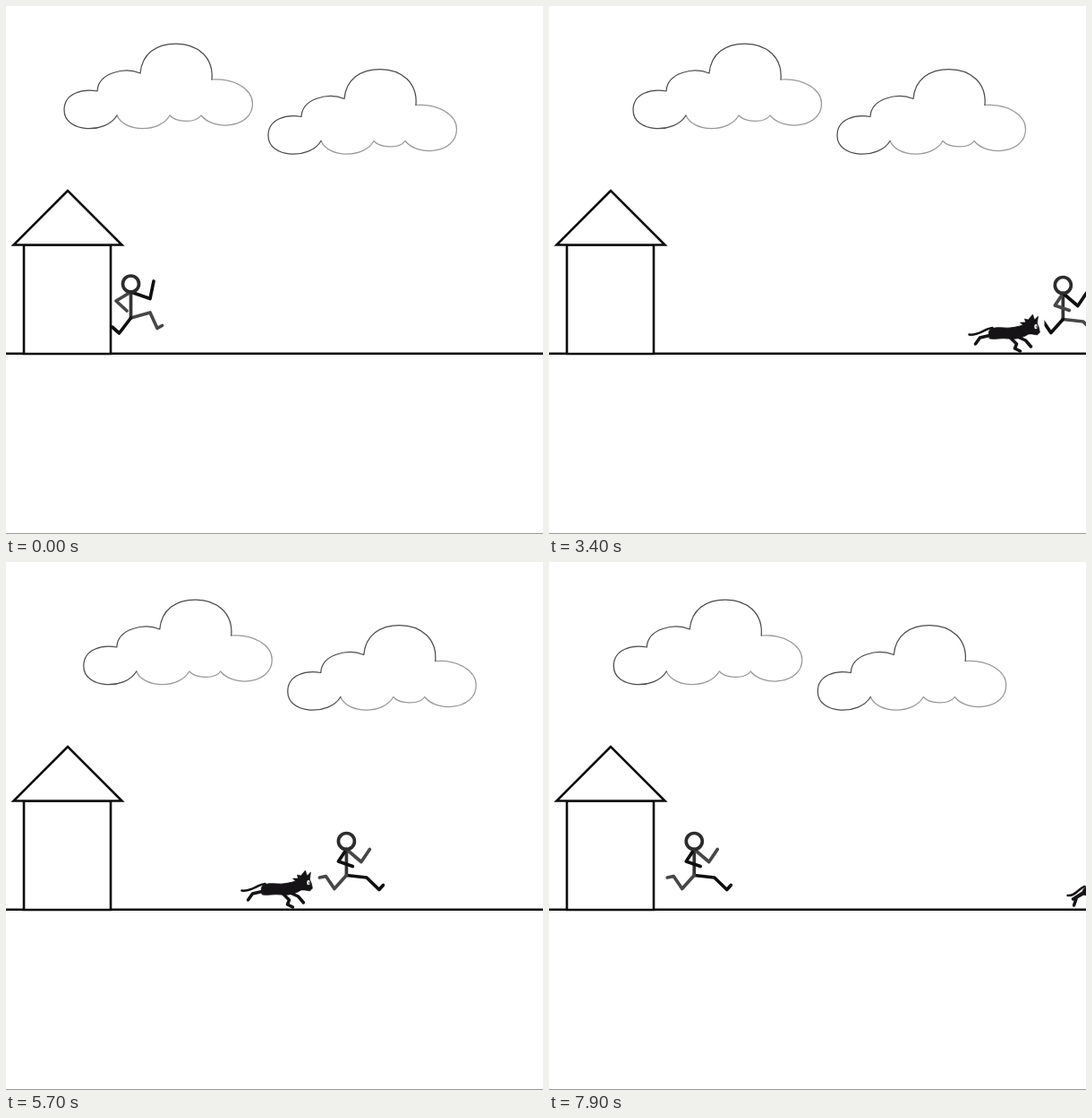
Write an HTML page that moves like this. It is 600 by 589 pixels and loops after 8000 ms.

```html
<!DOCTYPE html>
<html lang="en">
<head>
<meta charset="utf-8">
<title>Cat chase</title>
<style>
  html, body { margin: 0; width: 100%; height: 100%; overflow: hidden; background: #fff; }
  svg { display: block; width: 600px; height: 589px; }
  path, circle, line { fill: none; stroke-linecap: round; stroke-linejoin: round; }
  .house { stroke: #0c0c0c; stroke-width: 2.6; stroke-linejoin: miter; fill: #fff; }
  .man { stroke-width: 3.7; }
  .cat path { stroke: #151315; }
</style>
</head>
<body>
<svg viewBox="0 0 600 589">
  <defs>
    <g id="cloud" stroke-width="1.25">
      <path stroke="#999" d="M230,82 C255,80 275.500,93 275.500,109 C275.500,136 232,140 218,122 C212,131 190,130 183,122 C172,142 132,141 124,122"/>
      <path stroke="#4c4c4c" d="M124,122 C112,143 65,142 65,116 C65,97 86,92 102,95 C103,74 133,68 150,75 C152,53 168,42 190,42 C215,42 232,58 230,82"/>
    </g>
  </defs>
  <g id="clouds">
    <use href="#cloud"/>
    <use href="#cloud" x="228" y="28.500"/>
  </g>
  <g id="man" class="man"></g>
  <g id="cat" class="cat"></g>
  <line x1="0" y1="387.700" x2="600" y2="387.700" stroke="#0c0c0c" stroke-width="2.6"/>
  <path class="house" d="M20,266.500 H117 V388 H20 Z"/>
  <path class="house" d="M69,206 L8.500,266.500 H129.500 Z"/>
  <line x1="0" y1="588.500" x2="600" y2="588.500" stroke="#999" stroke-width="1"/>
</svg>
<script>
const LOOP = 8000, STEP = 100, TICKS_PER_SEC = 12, STRIDE = 12.12;
const DARK = '#0e0e0e', SOFT = '#474747';

const $ = id => document.getElementById(id);
const mod = (a, n) => ((a % n) + n) % n;

// Runner: limbs relative to the start column; far and near limbs swap every half cycle.
const runs = {
  push: { x: -2.8, y: 314.5, hip: 353,
    armBack: 'L-14,333 L-2,345', armFront: 'L10,336 L23,325',
    legBack: 'L-2,369 L-11,379 L-7,383', legFront: 'L22,356 L15,371 L18,375' },
  leap: { x: 0, y: 310, hip: 348,
    armBack: 'L-16.500,329 L-4.500,340', armFront: 'L21.500,326.500 L25.500,307',
    legBack: 'L-13,365 L-21,358 L-27,360', legFront: 'L21.500,342 L29.500,359.500 L35,356.500' },
  reach: { x: -1.5, y: 311.5, hip: 349.5,
    armBack: 'L-9,334 L7,339.500', armFront: 'L16.500,334.500 L26,320.500',
    legBack: 'L-13.500,364.500 L-23,350.500 L-30,352', legFront: 'L22.500,352 L36.500,365.500 L41,360.500' }
};

function drawRunner(run, swapped) {
  const near = swapped ? SOFT : DARK, far = swapped ? DARK : SOFT;
  const neck = run.y + 9;
  const limb = (y, pts, color) => `<path stroke="${color}" d="M0,${y} ${pts}"/>`;
  return `<g transform="translate(${run.x},0)">` +
    limb(neck, `L0,${run.hip}`, '#333') +
    limb(neck, run.armBack, far) + limb(run.hip, run.legFront, far) +
    limb(neck, run.armFront, near) + limb(run.hip, run.legBack, near) +
    `<circle cx="0" cy="${run.y}" r="9" stroke="#2c2c2c"/></g>`;
}

// Cat: tail, body, legs and head place, measured from its left edge.
const gaits = [
  { tail: 'M1,362 C14,365 17,349 29,355',
    body: 'M26,356 C29,350 39,352 45,354 C54,356 60,355 65,354 L67,365 C61,369 54,367 47,369 C38,370 31,372 27,368 Z',
    legs: 'M31,366 L24,374 L33,380 M44,368 L39,375 L42,381 M48,367 L57,376 L60,382 L66,383', head: [73, 358] },
  { tail: 'M1,349 C11,342 22,348 29,356',
    body: 'M26,360 C28,349 44,347 51,354 C58,358 62,357 66,357 L66,367 C59,370 54,371 47,370 C41,371 38,371 35,375 L27,372 Z',
    legs: 'M31,366 L27,376 L31,384 L36,385 M44,370 L49,376 L52,377 M54,368 L57,376 L60,374', head: [72.5, 357.5] },
  { tail: 'M0,366.500 C10,368 17,360 26,359',
    body: 'M22,363 C26,356 39,360 46,359 C55,358 60,356 66,354 L66,366 C60,370 52,372 44,371 C36,370 29,372 23,371 Z',
    legs: 'M25,367 L12,370 L7,377 M46,370 L53,377 L51,382 L57,385 M54,369 L63,373 L69,380', head: [69, 358] },
  { tail: 'M1,372 C10,373 13,364 20,362',
    body: 'M18,366 C22,359 33,361 42,361 C50,361 56,359 62,356 L63,367 C57,372 50,374 43,373 C34,371 25,374 19,371 Z',
    legs: 'M22,368 L11,374 L8,383 M18,369 L7,376 M48,371 L53,378 L61,384 M54,370 L62,375 L65,378', head: [68, 358.5] }
];
const HEAD = 'M-13,3 L-8,-1 L-12,-5 L-6,-5 L-7,-9 L-3,-8 L2,-14 L4,-8 L8,-12 L7,-4 L9,1 L10,6 L7,9 L1,8 L-10,8 Z';

function drawCat({ tail, body, legs, head }) {
  return '<rect y="340" width="84" height="46" fill="#fff"/>' +
    `<path stroke-width="2.500" d="${tail}"/>` +
    `<path stroke-width="3.500" d="${legs}"/>` +
    `<path style="fill:#151315" d="${body}"/>` +
    `<g transform="translate(${head})"><path style="fill:#151315" stroke-width=".6" d="${HEAD}"/>` +
    '<ellipse cx="5.500" cy="-.500" rx="1.800" ry="2.800" fill="#eee"/>' +
    '<circle cx="6.300" cy="0" r=".8" style="fill:#151315"/></g>';
}

const { push, leap, reach } = runs;
const runnerArt = [[leap, 0], [reach, 0], [push, 1], [leap, 1], [reach, 1], [push, 0]]
  .map(([run, swapped]) => drawRunner(run, swapped));
const catArt = gaits.map(drawCat);

// [time, pose count] pairs, counted up evenly in between.
const runnerBeat = [[0, 0], [300, 0], [1000, 6], [2400, 19], [3400, 31], [5000, 47], [6400, 58], [7900, 76]];
const catBeat = [[0, -9], [1000, 0], [2400, 13], [3400, 22], [5000, 39], [6400, 53], [7900, 67]];

function beatAt(beats, t) {
  const i = Math.max(1, beats.findIndex(b => b[0] >= t));
  const [t0, n0] = beats[i - 1], [t1, n1] = beats[i];
  return Math.floor(n0 + (n1 - n0) * (t - t0) / (t1 - t0) + 1e-6);
}

function place(el, x, art) {
  el.setAttribute('transform', `translate(${x.toFixed(2)},0)`);
  el.innerHTML = art;
}

// Clouds drift back and forth, 12 steps each way.
const cloudX = t => 65.25 - 7.25 * Math.abs(mod(t / STEP - 3, 24) - 12);

function render(t) {
  const tick = Math.floor(t * TICKS_PER_SEC / 1000 + 1e-6);
  $('clouds').setAttribute('transform', `translate(${cloudX(t)},0)`);

  const manPos = Math.max(0, tick % 44 - 4);
  place($('man'), 139.5 + STRIDE * manPos, runnerArt[mod(beatAt(runnerBeat, t), 6)]);

  const catPos = tick < 11 ? -1 : (tick - 11) % 45;
  place($('cat'), 118 + STRIDE * catPos, catPos < 0 ? '' : catArt[mod(beatAt(catBeat, t), 4)]);
}

let last = -1;
function loop() {
  const t = Math.floor(performance.now() % LOOP / STEP) * STEP;
  if (t !== last) render(last = t);
  requestAnimationFrame(loop);
}
loop();
</script>
</body>
</html>
```
